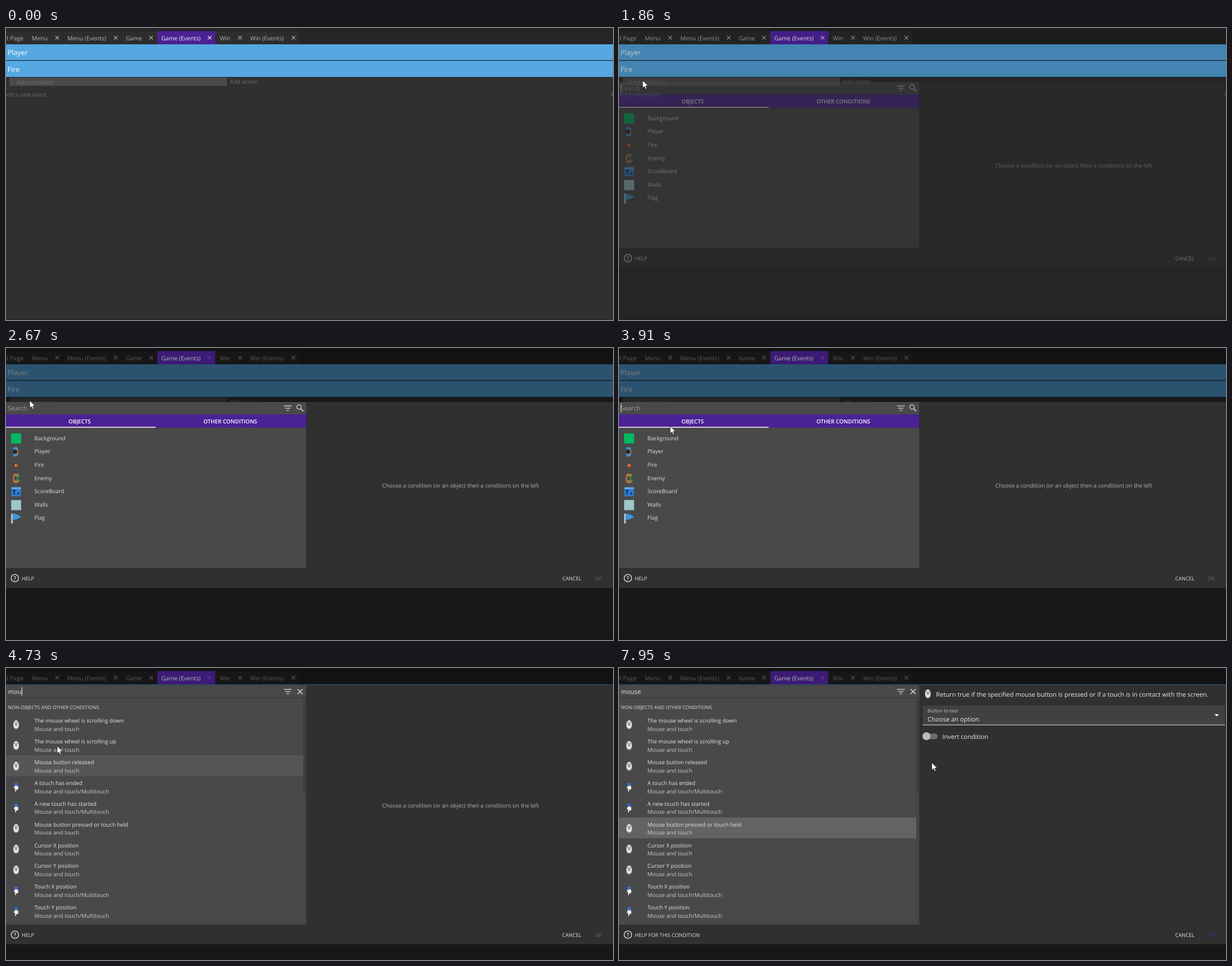
An HTML page for the animation above (8000 ms loop, 1079x519 px).

```html
<!DOCTYPE html>
<html lang="en">
<head>
<meta charset="utf-8">
<title>Event editor</title>
<style>
html, body { margin: 0; width: 100%; height: 100%; overflow: hidden; background: #303030; }
svg { display: block; width: 100%; height: 100%; }
text { font-family: "Open Sans", "Noto Sans", sans-serif; text-rendering: geometricPrecision; white-space: pre; }
</style>
</head>
<body>
<svg id="stage" viewBox="0 0 1079 519" xmlns="http://www.w3.org/2000/svg"></svg>
<script>
const LOOP = 8000;
const stage = document.getElementById('stage');

const rect = (x, y, w, h, fill, more = '') =>
  `<rect x="${x}" y="${y}" width="${w}" height="${h}" fill="${fill}" ${more}/>`;
const text = (x, y, s, size, fill, more = '') =>
  `<text x="${x}" y="${y}" font-size="${size}" fill="${fill}" ${more}>${s}</text>`;
const line = (d, color, w = 1, more = '') =>
  `<path d="${d}" fill="none" stroke="${color}" stroke-width="${w}" ${more}/>`;
const shape = (d, fill, more = '') => `<path d="${d}" fill="${fill}" ${more}/>`;
const oval = (x, y, rx, ry, fill, more = '') =>
  `<ellipse cx="${x}" cy="${y}" rx="${rx}" ry="${ry}" fill="${fill}" ${more}/>`;
const group = (id, body, more = '') => `<g id="${id}" ${more}>${body}</g>`;
const at = (x, y, body) => `<g transform="translate(${x} ${y})">${body}</g>`;
const cross = (x, y, r, color, w) =>
  line(`M${x - r} ${y - r}l${2 * r} ${2 * r}m0 ${-2 * r}l${-2 * r} ${2 * r}`, color, w);

/* Icons, centred on 0,0 */
const mouseIcon =
  oval(0, 0, 5, 8, '#d9d9d9') + oval(0, -1, 3.6, 6.3, '#f4f4f4') +
  line('M-2.6 -5L-1 1.5H1L2.6 -5M0 -6V0', '#77777a', 1.1) +
  shape('M-3 5.5Q0 7 3 5.5L1.8 7.8H-1.8Z', '#a98582');
const touchIcon =
  rect(-3, -7, 6, 5, '#2f6fd6') +
  shape('M-2.6 -2H3.4L4 3Q3 5 .3 5L-.6 8H-2L-1.6 3.5L-4 2Z', '#f0f0f0');
const filterIcon = line('M-7 -4H7M-4.6 0H4.6M-2 4H2', '#c4c4c4', 1.5);
const glassIcon =
  `<circle cx="-1.6" cy="-1.6" r="3.9" fill="none" stroke="#c4c4c4" stroke-width="1.5"/>` +
  line('M1.3 1.3L6 6', '#c4c4c4', 1.9);
const objects = [
  ['Background', rect(-9, -9, 18, 18, '#00b862')],
  ['Player', oval(-1, -5, 4.5, 3.2, '#3c8fd0') + oval(-1, 5.5, 4.5, 3.2, '#3c8fd0') +
    line('M0 -5.5Q6 0 0 5.5', '#a3814f', 2.4) + oval(-2, 0, 4, 3.8, '#26282c')],
  ['Fire', oval(0, 1, 3, 3, '#d9541e') + oval(-.7, .5, 1.3, 1.3, '#f49a4b')],
  ['Enemy', oval(0, -5.5, 5, 2.8, '#b5753c') + oval(0, 6, 5, 2.8, '#b5753c') +
    line('M-3.5 -5Q-6 0 -3.5 6', '#b9774a', 2.6) + line('M6 -5Q-3 0 6 5', '#1f9d57', 2.8) +
    oval(-1, 0, 2.4, 4, '#5c4631')],
  ['ScoreBoard', rect(-8.5, -7.5, 17, 16, '#2f7fd0') + rect(-8.5, -7.5, 17, 3, '#63aee8') +
    text(-7, 6, 'T', 12, '#10264f', 'font-weight="700"') +
    text(1.5, 6, 'x', 8, '#10264f', 'font-weight="700"')],
  ['Walls', rect(-9, -8.5, 18, 18, '#9fc6c9') + line('M-8.5 -8H8.5V9H-8.5Z', '#8fb4b7', 1)],
  ['Flag', rect(-9, -8, 3.3, 17.5, '#a9c0cc') + shape('M-5.7 -8Q0 -8 9 -2.5Q3 3 -5.7 3Z', '#3c97dc')]
];

const M = 'Mouse and touch', MT = M + '/Multitouch';
const rows = [
  ['The mouse wheel is scrolling down', M], ['The mouse wheel is scrolling up', M],
  ['Mouse button released', M], ['A touch has ended', MT], ['A new touch has started', MT],
  ['Mouse button pressed or touch held', M], ['Cursor X position', M], ['Cursor Y position', M],
  ['Touch X position', MT], ['Touch Y position', MT]
];
const ROW_TOP = 81.4, ROW_H = 36.87;

/* Editor behind the dialog */
function editor() {
  const tabs = [[-11, 't Page', 0], [46, 'Menu', 91], [109, 'Menu (Events)', 195], [213, 'Game', 258],
    [276, 'Game (Events)', 362], [380, 'Win', 416], [434, 'Win (Events)', 511]];
  let s = rect(0, 0, 1079, 519, '#303030') + rect(0, 0, 1079, 29, '#252525') + rect(0, 6, 521, 23, '#2d2d2d');
  for (const x of [39, 101, 205, 426]) s += rect(x, 6, 1, 23, '#292929');
  s += rect(269, 5.5, 103, 23.5, '#4a2294', 'id="tab"');
  for (const [x, name, close] of tabs) {
    const color = x === 276 ? '#f0f0f0' : '#b4b4b4';
    s += x < 0 ? text(31, 21.6, name, 10.45, color, 'text-anchor="end"') : text(x, 21.6, name, 10.45, color);
    if (close) s += cross(close, 17.2, 3.1, color, 1.2);
  }
  s += rect(0, 29, 1079, 58, '#56a8e2') + rect(0, 57, 1079, 1.3, '#23303a');
  s += text(2.8, 48.2, 'Player', 12.4, '#fff') + text(2.8, 77.6, 'Fire', 12.4, '#fff');
  s += rect(0, 87, 1079, 1, '#2a2a2a') + rect(0, 95.5, 7, 1, '#4c4c4c');
  s += rect(6.5, 88, 387.5, 15, '#4a4a4a') + rect(14, 88, 1, 15, '#3a3a3a') + rect(393.5, 88, 1.2, 15, '#222');
  s += text(19, 99.6, 'Add condition', 10, '#707070') + text(398, 99.2, 'Add action', 10, '#6f6f6f');
  s += text(72.5, 122.4, 'Add a new event', 10, '#6b6b6b', 'text-anchor="end"') + text(1074.5, 122.4, 'Add', 10, '#6b6b6b');
  s += rect(0, 518, 1079, 1, '#222');
  return s + group('picked', line('M0 87.3H1079', '#1d2b36', 1, 'stroke-dasharray="1.5 1.5"') +
    line('M14.5 89V102', '#2f80b8', 1, 'stroke-dasharray="1.5 1.5"'));
}

const footer = (y, id) =>
  `<circle cx="15.8" cy="${y}" r="6.6" fill="none" stroke="#e6e6e6" stroke-width="1.3"/>` +
  text(15.8, y + 3.7, '?', 10, '#e6e6e6', 'text-anchor="middle" font-weight="600"') +
  text(28, y + 3.6, 'HELP', 9.1, '#e6e6e6', `id="help${id}"`) +
  text(988.8, y + 3.6, 'CANCEL', 9.1, '#e6e6e6') + text(1046.5, y + 3.6, 'OK', 9.1, '#6a6a6a', `id="ok${id}"`);

const hint = group('hintX', text(668.8, 247.6, 'Choose a condition (or an object then a condition) on the left', 9.87, '#b2b2b2'));

function smallDialog() {
  let s = rect(0, 96, 1079, 330.5, '#303030') + rect(0, 96, 534, 295, '#494949') + rect(534, 96, 1, 295, '#262626');
  s += rect(0, 118, 534, 23.5, '#4a2296') + rect(0, 140, 266, 1.6, '#f2f2f2');
  s += text(3, 111, 'Search', 11.1, '#a0a0a0') + at(501, 107, filterIcon) + at(522.5, 106.5, glassIcon);
  s += text(111, 133.6, 'OBJECTS', 9.8, '#fff', 'font-weight="600"') +
    text(351, 133.6, 'OTHER CONDITIONS', 9.8, '#fff', 'font-weight="600"');
  s += rect(0, 148.5, 528, 23.6, '#fff', 'id="objHover"');
  objects.forEach(([name, icon], i) => {
    const y = 160.2 + 23.6 * i;
    s += at(18, y + .5, icon) + text(50.6, y + 3.6, name, 9.85, '#dedede');
  });
  return s + hint.replace('hintX', 'hintA') + footer(409, 'A') + rect(3, 98.5, 1, 16, '#e8e8e8', 'id="caretA"');
}

function bigDialog() {
  let s = rect(0, 30.5, 1079, 460.5, '#303030') + rect(0, 30.5, 534, 425.5, '#494949') + rect(534, 30.5, 1, 425.5, '#2b2b2b');
  s += rect(0, 52, 534, 1.2, '#393939') + rect(528.5, 53.5, 5.5, 402.5, '#454545') + rect(528.5, 53.5, 5.5, 167, '#3f3f3f');
  s += text(3.8, 45.8, '', 11, '#ececec', 'id="query"') + at(501, 42, filterIcon) + cross(522.8, 42, 4.4, '#cfcfcf', 1.5);
  s += text(3.5, 73.2, 'NON-OBJECTS AND OTHER CONDITIONS', 8.65, '#dcdcdc');
  rows.forEach(([title, kind], i) => {
    const y = ROW_TOP + ROW_H * i;
    s += rect(0, y, 528.5, ROW_H, '#fff', `id="row${i}" opacity="0"`);
    s += at(18, y + 19.5, kind === M ? mouseIcon : touchIcon);
    s += text(50.6, y + 15.9, title, 9.82, '#e4e4e4') + text(50.6, y + 30.5, kind, 9.82, '#cacaca');
  });
  const form = at(549, 46, mouseIcon) +
    text(563.6, 50.9, 'Return true if the specified mouse button is pressed or if a touch is in contact with the screen.', 11.13, '#ebebeb') +
    shape('M540 101V69Q540 66.5 542.5 66.5H1074.5Q1077 66.5 1077 69V101Z', '#414141') + rect(540, 100.6, 537, 1.2, '#c9c9c9') +
    text(548.6, 79, 'Button to test', 8.45, '#c6c6c6') + text(548.6, 94.6, 'Choose an option', 11.15, '#ececec') +
    shape('M1058.5 82H1066.5L1062.5 86.2Z', '#f0f0f0') +
    rect(541, 116.4, 25.5, 10, '#6c6c6c', 'rx="5"') + oval(546.5, 121.3, 7, 7, '#bdbdbd') +
    text(574.6, 125.8, 'Invert condition', 11.12, '#ebebeb');
  return s + hint.replace('hintX', 'hintB') + group('form', form) + footer(474, 'B') +
    rect(0, 34, 1, 15.5, '#f0f0f0', 'id="caretB"');
}

const ink = 'stroke="#1c1c1c" stroke-width=".8" stroke-linejoin="round"';
const arrow = shape('M0 0V13.6L3.1 10.8L5.2 15.6L7.4 14.6L5.3 10H9.6Z', '#fff', ink);
const hand = shape('M-1.7 1.2Q-1.7 -.4 -.1 -.4T1.5 1.2V5.6Q3 4.8 4 6Q5.4 5.4 6.2 6.8Q8 6.6 8 8.4V11Q8 13.4 6.6 14.6V16.4H-1V14.6L-5.6 9.6Q-6.2 8 -4.6 7.8L-1.7 9.8Z', '#fff', ink);

stage.innerHTML = editor() + group('shade', rect(0, 0, 1079, 519, '#000', 'opacity=".5"') +
  rect(269, 5.5, 103, 23.5, '#4a2294', 'opacity=".6"') + text(276, 21.6, 'Game (Events)', 10.45, '#a8a8a8')) +
  group('small', smallDialog()) + group('big', bigDialog()) + group('cursor', group('arrow', arrow) + group('hand', hand));

const el = {};
stage.querySelectorAll('[id]').forEach(e => el[e.id] = e);
const show = (e, on) => e.setAttribute('visibility', on ? 'inherit' : 'hidden');
const fade = (e, a) => e.setAttribute('opacity', a);
const clamp = v => Math.max(0, Math.min(1, v));

/* Pointer hot spot: time, x, y */
const path = [
  [290, 888, 505], [420, 760, 425], [560, 530, 312], [700, 300, 208], [820, 150, 150], [920, 80, 127],
  [1020, 63, 118], [1060, 64, 107], [1110, 66, 99], [1210, 69, 93], [1430, 69, 93], [1520, 52, 95], [1620, 42, 93],
  [2670, 42, 93], [2860, 62, 128], [3040, 86, 164], [3180, 94, 168], [3320, 86, 148], [3430, 82, 138], [3480, 91, 138.5],
  [6090, 91, 138.5], [6250, 102, 160], [6370, 119, 190], [6420, 125, 215.5], [6560, 134, 250], [6680, 134, 268],
  [6800, 130, 264], [6930, 138, 271], [7660, 138, 271], [7730, 262, 273], [7830, 440, 220], [7900, 532, 178], [7950, 556, 168]
];
function pointer(t) {
  let i = 0;
  while (i < path.length - 2 && t >= path[i + 1][0]) i++;
  const [t0, x0, y0] = path[i], [t1, x1, y1] = path[i + 1];
  const p = clamp((t - t0) / (t1 - t0));
  return [x0 + (x1 - x0) * p, y0 + (y1 - y0) * p];
}

function hoverRow(t) {
  if (t < 6200) return 2;
  if (t > 7100) return 5;
  return Math.floor((pointer(t)[1] - ROW_TOP) / ROW_H);
}

const keys = [4360, 4560, 4730, 4880, 5040];

function draw(t) {
  const [x, y] = pointer(t);
  const open = 1 - (1 - clamp((t - 1795) / 275)) ** 2;
  const big = t >= 4360, chosen = t >= 7100;

  show(el.picked, t >= 1430);
  fade(el.shade, open);
  fade(el.small, open);
  show(el.small, !big);
  show(el.big, big);

  fade(el.objHover, !big && y > 148 ? .05 : 0);
  show(el.caretA, !big && (t < 2340 || (t >= 2860 && t < 3380) || t >= 3910));

  if (big) {
    el.query.textContent = 'mouse'.slice(0, keys.filter(k => t >= k).length);
    el.caretB.setAttribute('x', 4.2 + el.query.getComputedTextLength());
    show(el.caretB, t < 5580 || (t >= 6090 && t < 6600));
    const heat = rows.map(() => 0), n = 20;
    for (let i = 0; i < n; i++) heat[hoverRow(t - i * 10)] += 1 / n;
    const press = clamp((t - 7100) / 200);
    heat.forEach((h, i) => fade(el['row' + i], h * .07 + (i === 5 ? press * .07 : 0)));
    show(el.hintB, !chosen);
    show(el.form, chosen);
    el.helpB.textContent = chosen ? 'HELP FOR THIS CONDITION' : 'HELP';
    el.okB.setAttribute('fill', chosen ? '#4a27a8' : '#6a6a6a');
  }

  const onLink = t < 1800 && y < 124 && x < 75;
  show(el.cursor, t >= 290);
  show(el.hand, onLink);
  show(el.arrow, !onLink);
  el.cursor.setAttribute('transform', `translate(${x.toFixed(1)} ${y.toFixed(1)})`);
}

function tick() {
  draw(performance.now() % LOOP);
  requestAnimationFrame(tick);
}
tick();
</script>
</body>
</html>
```
